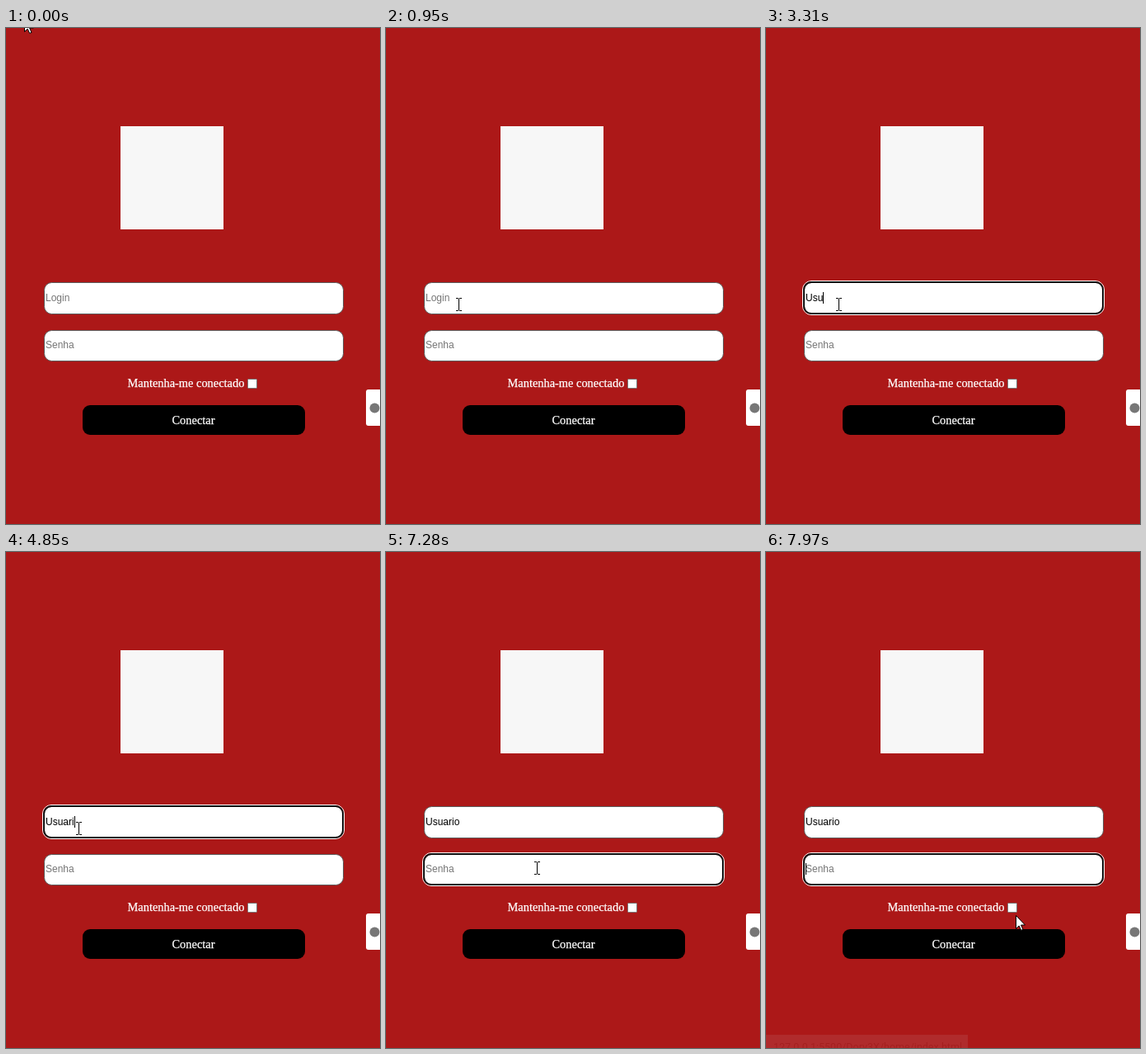
Write an HTML page that moves like this. It is 454 by 601 pixels and loops after 7.99 s.

```html
<!DOCTYPE html>
<html lang="pt">
<head>
<meta charset="utf-8">
<style>
  html, body { margin: 0; width: 100%; height: 100%; overflow: hidden; background: #ac1818; }
  svg { display: block; }
  .sans { font: 12px "Liberation Sans", Arial, sans-serif; }
  .serif { font: 14.4px "Liberation Serif", "Times New Roman", serif; fill: #fff; stroke: #fff; stroke-width: .25px; }
  .url { font: 12.5px Roboto, sans-serif; fill: #5f6368; }
  .field { fill: #fff; stroke: #5c5c5c; }
  .halo { fill: none; stroke: #fff; }
  .ring { fill: none; stroke: #101010; stroke-width: 2px; }
</style>
</head>
<body>
<svg width="454" height="601" viewBox="0 0 454 601">
  <rect width="454" height="601" fill="#ac1818"/>
  <rect x="139" y="119" width="125" height="125" fill="#f7f7f7"/>

  <rect class="field" x="46.5" y="308.5" width="363" height="38" rx="9"/>
  <g id="loginFocus">
    <rect class="halo" x="44.5" y="306.5" width="366" height="41" rx="10.5"/>
    <rect class="ring" x="46" y="308" width="363" height="38" rx="9"/>
  </g>
  <text id="login" class="sans" x="48" y="331"></text>

  <rect class="field" x="46.5" y="366.5" width="363" height="37" rx="9"/>
  <g id="senhaFocus">
    <rect class="halo" x="44.5" y="364.5" width="366" height="40" rx="10.5"/>
    <rect class="ring" x="46" y="366" width="363" height="37" rx="9"/>
  </g>
  <text class="sans" x="48" y="388" fill="#757575">Senha</text>
  <rect id="caret" width="1" height="14"/>

  <text class="serif" x="147.5" y="435">Mantenha-me conectado</text>
  <rect x="293.5" y="425.5" width="11" height="11" rx="1" fill="#fff" stroke="#767676"/>
  <rect x="93" y="457" width="270" height="36" rx="9"/>
  <text class="serif" x="227.5" y="480" text-anchor="middle">Conectar</text>

  <rect x="437" y="438" width="24" height="44" rx="3" fill="#fff"/>
  <circle cx="447.5" cy="460.5" r="6" fill="#777"/>

  <g id="status">
    <rect y="585" width="245" height="16" fill="#dee1e6"/>
    <text class="url" x="9" y="604">127.0.0.1:5500/Dorv3X/home/index.html</text>
  </g>

  <g id="pointer">
    <path id="arrow" d="M.5 .5V16.5L4.2 13L6.7 18.4L9 17.4L6.6 12H11.5z" fill="#fff" stroke="#000"/>
    <path id="beam" d="M-3 -7.5h3M1 -7.5h3M.5 -7V7M-3 7.5h3M1 7.5h3" fill="none" stroke="#000"/>
    <path id="hand" d="M-2 1.5a2 2 0 0 1 4 0V7l6 1.5q2 .8 2 3V15l-2 5v2H-2v-2l-5-7q-.5-3 2-2l3 2zM2 7v4M5 8v3M8 9v3" fill="#fff" stroke="#000"/>
  </g>
</svg>
<script>
const LOOP = 7990, BLINK = 515;
const FOCUS_LOGIN = 1050, FOCUS_SENHA = 6760;
const keyTimes = [2350, 2840, 3310, 4290, 4620, 4850, 5030];

const el = id => document.getElementById(id);
const show = (id, on) => el(id).style.display = on ? '' : 'none';
const clamp = v => Math.max(0, Math.min(1, v));
const smooth = p => p * p * (3 - 2 * p);
const linear = p => p;

// Mouse glides along cubic curves
const glides = [
  { from: 180, to: 950, ease: smooth, curve: [[22, -12], [44, 100], [72, 225], [88, 335]] },
  { from: 5770, to: 6440, ease: linear, curve: [[88, 335], [125, 425], [163, 430], [183, 383]] },
  { from: 7280, to: 7780, ease: linear, curve: [[183, 383], [220, 390], [320, 475], [344, 459]] },
  { from: 7780, to: 7970, ease: linear, curve: [[344, 459], [340, 470], [315, 460], [303, 440]] }
];

function bezier([a, b, c, d], s) {
  const r = 1 - s;
  return [0, 1].map(i => Math.round(
    r * r * r * a[i] + 3 * r * r * s * b[i] + 3 * r * s * s * c[i] + s * s * s * d[i]));
}

function mouseAt(t) {
  const g = glides.filter(g => t >= g.from).pop() || glides[0];
  return bezier(g.curve, g.ease(clamp((t - g.from) / (g.to - g.from))));
}

const inside = (x, y, left, top, right, bottom) => x >= left && x < right && y >= top && y < bottom;

function drawForm(t) {
  const typed = keyTimes.filter(k => t >= k).length;
  const onSenha = t >= FOCUS_SENHA;
  const login = el('login');
  login.textContent = typed ? 'Usuario'.slice(0, typed) : 'Login';
  login.setAttribute('fill', typed ? '#000' : '#757575');
  show('loginFocus', t >= FOCUS_LOGIN && !onSenha);
  show('senhaFocus', onSenha);

  // Every key press or focus restarts the blink
  const lastInput = [FOCUS_LOGIN, ...keyTimes, FOCUS_SENHA].filter(k => t >= k).pop();
  show('caret', Math.floor((t - lastInput) / BLINK) % 2 === 0);
  const atStart = onSenha || !typed;
  el('caret').setAttribute('x', 48 + (atStart ? 0 : Math.round(login.getComputedTextLength())));
  el('caret').setAttribute('y', onSenha ? 377 : 320);
}

function drawPointer(t) {
  const [x, y] = mouseAt(t);
  const text = inside(x, y, 46, 308, 410, 347) || inside(x, y, 46, 366, 410, 404);
  const button = inside(x, y, 93, 457, 363, 493);
  show('beam', text);
  show('hand', button);
  show('arrow', !text && !button);
  show('pointer', t < 20 || t >= 180);
  el('pointer').setAttribute('transform', `translate(${x} ${y})`);
}

function draw(t) {
  drawForm(t);
  drawPointer(t);
  el('status').setAttribute('opacity', clamp(Math.min((t - 7744) / 120, (LOOP - t) / 200)));
}

const start = performance.now();
function tick() {
  draw((performance.now() - start) % LOOP);
  requestAnimationFrame(tick);
}
tick();
</script>
</body>
</html>
```
